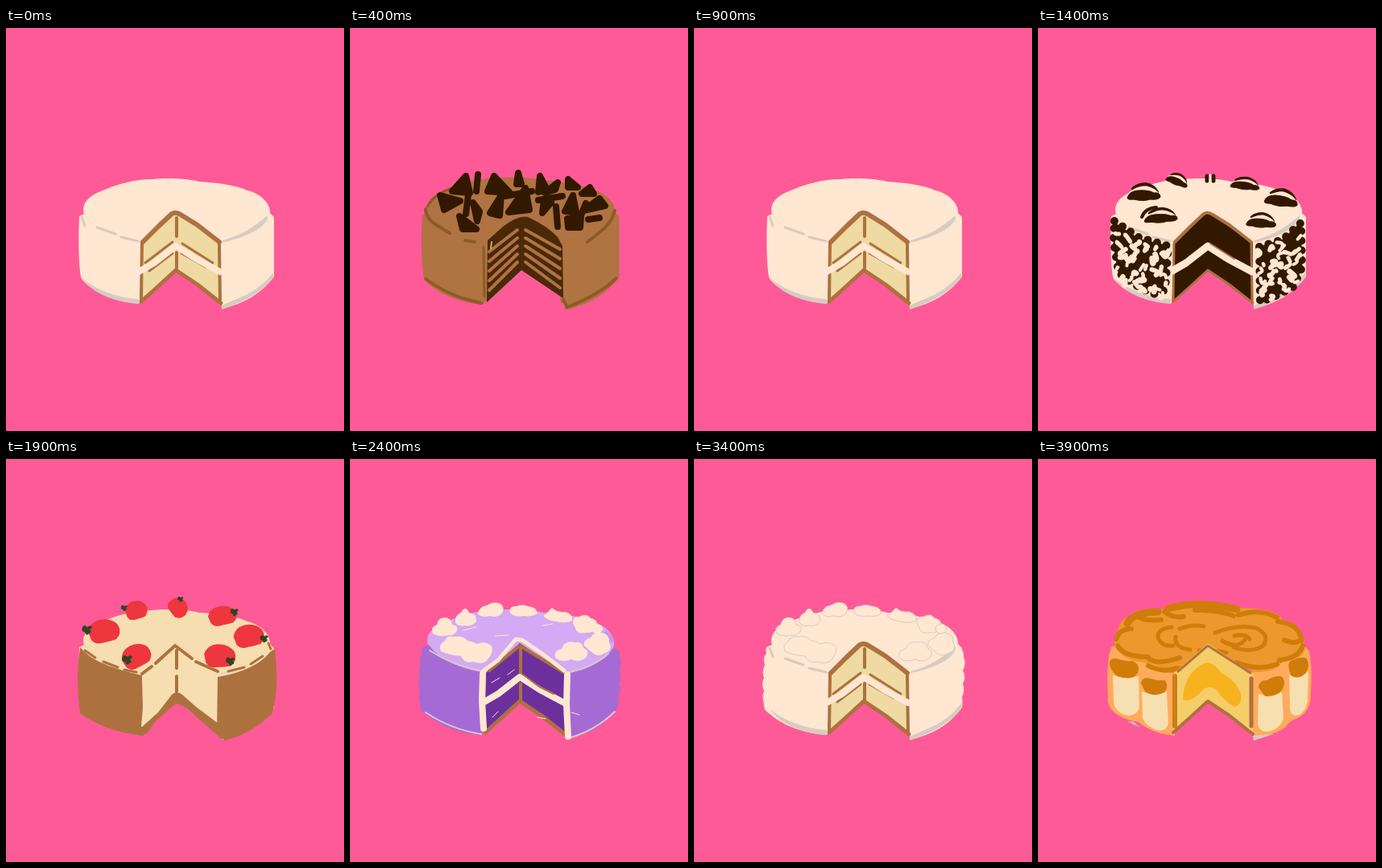
Write an HTML page that moves like this. It is 420 px wide and 501 px high and loops after 4.4 s.

```html
<!DOCTYPE html>
<html lang="en">
<head>
<meta charset="utf-8">
<title>Cakes</title>
<style>
html, body { margin: 0; width: 100%; height: 100%; overflow: hidden; background: #ff5a98; }
svg { display: block; width: 100%; height: 100%; }
.cake { visibility: hidden; animation: show 4400ms step-end infinite; animation-delay: calc(var(--at) * 1ms - 4400ms); }
.first { animation-name: first; animation-delay: 0ms; }
@keyframes show { 0% { visibility: visible; } 11.3636%, 100% { visibility: hidden; } }
@keyframes first { 0% { visibility: visible; } 9.0909%, 100% { visibility: hidden; } }
.line { fill: none; stroke-linecap: round; stroke-linejoin: round; }
.cream { fill: #ffe7d2; }
.dark { fill: #331800; stroke: #331800; }
.beads { fill: none; stroke: #331800; stroke-width: 10; stroke-linecap: round; stroke-dasharray: 0 12; }
.brown { stroke: #ad713f; }
</style>
</head>
<body>
<svg viewBox="0 0 420 501" preserveAspectRatio="none">
<defs>
  <path id="top" d="M97 231C93 218 104 208 118 203C138 194 160 188 182 188C200 186 225 187 240 191C260 192 285 195 300 202C318 206 330 220 328 232C324 246 300 260 266 267L211 229L169 266C135 260 108 250 97 231Z"/>
  <path id="left" d="M91 234L97 231C108 249 135 260 170 266L166 342C135 341 105 326 94 312C90 300 90 260 91 234Z"/>
  <path id="right" d="M266 267C300 260 320 248 328 230L333 235V309C318 330 295 343 268 349Z"/>
  <path id="cut" d="M169 266L211 229L267 267V343L212 301L167 341Z"/>
  <path id="band" d="M165 303L184 292L211 271L236 287L266 303"/>
  <path id="roof" d="M170 266L189 247L206 231Q211 228 217 232L238 245L265 266"/>
  <path id="floor" d="M168 340L187 323L211 301L238 319L267 342"/>
  <path id="walls" d="M169 268L168 339M265 268L266 341"/>
  <path id="puffLeft" d="M92 233L98 231C110 249 135 260 167 266L164 343C135 341 108 330 93 316Q86 312 87 304Q84 296 87 288Q83 280 87 272Q84 264 88 256Q85 246 90 242Q88 235 92 233Z"/>
  <path id="puffRight" d="M268 266C300 260 318 248 326 236Q336 234 335 246Q339 255 334 263Q339 272 334 279Q337 289 333 296Q336 310 326 317C313 333 293 343 270 348Z"/>
  <g id="dollops">
    <path d="M103 217Q99 209 108 206Q109 198 117 197Q126 197 127 206Q136 207 132 215Q128 220 123 219Q111 222 103 217ZM113 239Q109 231 118 226Q120 219 130 221Q140 219 146 226Q154 227 157 230Q170 225 177 234Q177 243 172 248Q166 257 153 252Q142 255 138 245Q123 244 113 239ZM131 203Q130 194 138 191Q143 181 148 191Q158 193 157 202Q151 209 143 207Q134 209 131 203ZM159 192Q161 183 170 182Q179 176 187 180Q193 184 189 192Q182 198 174 195Q163 198 159 192ZM199 191Q197 183 206 183Q214 180 221 183Q232 184 233 192Q225 197 216 195Q204 197 199 191ZM240 195Q246 191 251 185Q257 191 267 190Q278 193 276 201Q266 205 257 202Q247 202 240 195ZM277 204Q277 195 285 196Q294 191 299 198Q309 200 306 208Q304 217 294 216Q281 218 280 210ZM291 232Q289 225 299 222Q304 214 313 216Q323 218 322 228Q327 238 317 241Q308 248 299 239ZM255 247Q253 238 263 236Q267 225 279 228Q289 226 290 235Q299 239 293 247Q284 254 275 249Q264 254 255 247Z"/>
    <ellipse cx="307" cy="211" rx="7" ry="6"/>
  </g>
  <g id="plain">
    <g class="cream"><use href="#top"/><use href="#left"/><use href="#right"/></g>
    <path fill="#d8cbc0" d="M94 311C112 325 135 335 165 337V343C135 341 108 330 94 311ZM268 345L300 331Q320 320 332 304V311Q312 335 268 350Z"/>
    <path class="line" stroke="#d8cbc0" stroke-width="3" d="M94 235L98 246M113 248L136 256M143 260L164 265"/>
    <path fill="#d8cbc0" d="M269 264Q298 257 325 233Q326 243 308 253Q291 262 269 266Z"/>
  </g>
  <g id="vanilla">
    <use href="#plain"/>
    <use href="#cut" fill="#eedaa2"/>
    <g class="line brown">
      <use href="#walls" stroke-width="4"/>
      <use href="#floor" stroke-width="5"/>
      <use href="#roof" stroke-width="6"/>
      <path stroke-width="4" d="M212 236V259M212 279V300"/>
      <path stroke-width="3" d="M173 292L207 266M219 268L257 292M178 302L207 280M218 280L248 297"/>
    </g>
    <use href="#band" class="line" stroke="#ffe7d2" stroke-width="8"/>
  </g>
  <path id="berry" fill="#ee363f" d="M-20 1Q-18 -11 -6 -14Q9 -17 17 -8Q23 2 15 10Q6 13 0 14Q-10 18 -16 11Z"/>
  <path id="leaf" fill="#2b4623" d="M-6 -3Q-4 -7 0 -3Q5 -7 6 -2L3 0Q7 4 2 5Q-1 9 -3 3Q-8 3 -6 -3Z"/>
  <g id="cookie">
    <path class="line" stroke="#331800" stroke-width="4" d="M-13 -5Q-7 -11 3 -11Q13 -9 17 -1"/>
    <path class="line" stroke="#ffe7d2" stroke-width="4" d="M-16 0Q-6 -7 4 -6Q13 -5 18 2"/>
    <path class="dark" stroke="none" d="M-20 6Q-18 -2 -7 -3Q6 -4 13 0Q21 -1 21 5Q19 9 8 8Q0 11 -12 8Q-20 9 -20 6Z"/>
  </g>
  <clipPath id="inTop"><use href="#top"/></clipPath>
  <clipPath id="inLeft"><use href="#left"/></clipPath>
  <clipPath id="inRight"><use href="#right"/></clipPath>
</defs>
<rect width="420" height="501" fill="#ff5a98"/>

<g class="cake first"><use href="#vanilla"/></g>

<g class="cake" style="--at:400">
  <g fill="#b07342" stroke="#b07342" stroke-width="3" stroke-linejoin="round">
    <use href="#top"/><use href="#left"/><use href="#right"/>
  </g>
  <path class="line" stroke="#b07342" stroke-width="8" d="M168 268V336M265 268V338M168 266L211 235L262 266"/>
  <g class="line" stroke="#8e5b27">
    <path stroke-width="4" d="M94 225Q94 237 109 246L124 255M94 312Q116 328 140 336L163 342M143 264L155 266"/>
    <path stroke-width="4" d="M329 227Q326 242 309 255L295 266M331 311Q311 331 270 347L265 338"/>
    <path stroke-width="3" d="M96 222Q106 205 130 198M166 272L167 334"/>
  </g>
  <path fill="#4a2908" d="M171 264L190 247Q214 229 225 237Q246 247 258 260L264 271L265 336L213 301L170 341Z"/>
  <g id="stripes" class="line" stroke="#b07342" stroke-width="4"></g>
  <path class="line" stroke="#4a2908" stroke-width="4" d="M213 240V299"/>
  <path class="line" stroke="#d5a56c" stroke-width="2" d="M176 266L175 274"/>
  <path class="dark" stroke-width="8" stroke-linejoin="round" stroke-linecap="round" d="M144 184L127 203L149 205ZM159 182L157 203M112 208L137 215L117 226ZM147 207L144 231M136 234L157 250L140 250ZM153 217L161 228L158 240ZM179 184L199 205L171 203ZM188 208L174 230L186 233ZM209 180L207 194L213 194ZM193 209L226 203M218 199L197 229L223 226ZM236 184L234 204L245 201ZM258 192L242 205L255 201ZM271 188L271 198L283 198ZM234 214L264 209M241 213L239 230L250 217M256 222L258 247M277 208L267 228L281 228ZM298 198L288 206L303 206ZM310 212L317 221L290 227ZM270 237L287 234L286 248L271 248ZM310 236L296 238M287 233L293 218"/>
</g>

<g class="cake" style="--at:900"><use href="#vanilla"/></g>

<g class="cake" style="--at:1400">
  <use href="#plain"/>
  <use href="#cut" fill="#331800"/>
  <g class="line brown"><use href="#roof" stroke-width="4"/><use href="#walls" stroke-width="3"/><use href="#floor" stroke-width="3"/></g>
  <use href="#band" class="line" stroke="#ffe7d2" stroke-width="9"/>
  <path class="line brown" stroke-width="2" d="M214 268L244 287"/>
  <path class="dark" stroke="none" d="M95 242L125 262L162 271L158 328L143 329L118 318L100 304L94 270Z"/>
  <path class="dark" stroke="none" d="M275 272L304 263L326 242L328 298L317 322L298 332L276 341Z"/>
  <path class="beads" d="M95 240L125 260L162 271L158 326L143 331L118 318L100 304L94 266Z"/>
  <path class="beads" d="M275 272L304 263L327 242L328 298L317 322L298 332L276 341Z"/>
  <g class="line" stroke="#ffe7d2">
    <g clip-path="url(#inLeft)" id="bitsL"></g>
    <g clip-path="url(#inRight)" id="bitsR"></g>
  </g>
  <use href="#cookie" x="131" y="205"/>
  <use href="#cookie" transform="translate(173 189) rotate(22) scale(.68)"/>
  <g class="line" stroke="#331800" stroke-width="5"><path d="M210 184V190M218 184V190"/><path stroke="#ffe7d2" stroke-width="3" d="M214 183V191"/></g>
  <use href="#cookie" transform="translate(257 194) rotate(7) scale(.88 .72)"/>
  <use href="#cookie" transform="translate(302 212) rotate(8)"/>
  <use href="#cookie" transform="translate(277 240) rotate(4) scale(.9 .85)"/>
  <use href="#cookie" transform="translate(152 234) rotate(-3) scale(1 .85)"/>
  <path class="line" stroke="#331800" stroke-width="4" d="M129 235Q133 224 147 223"/>
</g>

<g class="cake" style="--at:1900">
  <g fill="#f6deb0"><use href="#left"/><use href="#right"/><use href="#top"/><use href="#cut"/></g>
  <path fill="#ad713f" d="M92 234L98 240C112 254 140 262 169 269L170 310L168 332L175 339L170 344C140 341 112 331 92 316Q86 272 92 234ZM263 271C298 265 318 253 328 240L334 236Q338 270 335 296L331 316C316 331 296 344 272 350L262 342Z"/>
  <path fill="#ad713f" d="M168 334L189 315L206 293Q212 287 219 293L236 308L268 332L269 349L237 321Q220 305 211 304L187 325L174 342Z"/>
  <g class="line brown">
    <path stroke-width="4" d="M169 267L181 258M186 254L210 232L231 248M236 252L263 264M212 238V260M212 270V289"/>
    <path stroke-width="3" d="M98 238L111 247M121 252L139 259M147 262L162 265M276 264L296 259M304 255L319 245M326 229L329 236"/>
  </g>
  <use href="#berry" x="122" y="214"/>
  <use href="#berry" transform="translate(162 188) scale(.7 .8)"/>
  <use href="#berry" transform="translate(214 185) rotate(70) scale(.65 .78)"/>
  <use href="#berry" transform="translate(269 195) scale(.9 .83)"/>
  <use href="#berry" transform="translate(302 220) scale(.97)"/>
  <use href="#berry" transform="translate(266 245) rotate(10)"/>
  <use href="#berry" transform="translate(162 245) rotate(-14) scale(.95 1)"/>
  <use href="#leaf" x="101" y="212"/><use href="#leaf" transform="translate(147 185) scale(.65)"/>
  <use href="#leaf" transform="translate(217 174) scale(.6)"/><use href="#leaf" transform="translate(284 190) scale(.8)"/>
  <use href="#leaf" transform="translate(321 223) scale(.8)"/><use href="#leaf" transform="translate(279 251) scale(.9)"/>
  <use href="#leaf" x="151" y="249"/>
</g>

<g class="cake" style="--at:2400">
  <use href="#top" fill="#d3aaf3"/>
  <g fill="#a66ad5"><use href="#puffLeft"/><use href="#puffRight"/></g>
  <use href="#cut" fill="#6c309d"/>
  <path class="line" stroke="#d9c9c9" stroke-width="2" d="M94 315Q125 336 163 342M272 347Q306 337 329 314M99 238Q128 257 166 264M273 265Q302 259 321 242"/>
  <g class="line brown"><use href="#floor" stroke-width="5"/><path stroke-width="4" d="M173 263L211 232L265 265M212 234V268M212 280V300M268 268V292"/></g>
  <g class="line" stroke="#ffe7d2">
    <path stroke-width="5" d="M165 264L184 250L206 224L214 225L240 243L266 263"/>
    <path stroke-width="8" d="M165 267L164 300L166 335M270 268L269 305L271 345"/>
    <use href="#band" stroke-width="8"/>
    <path stroke-width="1" d="M140 213L157 209M180 220L197 219M239 207L252 205M176 278L186 272M177 321L184 314M233 321L243 323M275 315L285 318M196 268L204 262"/>
  </g>
  <path class="line brown" stroke-width="2" d="M215 268L235 283L253 292"/>
  <path class="line" stroke="#c795ea" stroke-width="6" d="M319 217L325 225"/>
  <use href="#dollops" class="cream"/>
</g>

<g class="cake" style="--at:2900">
  <g fill="#e3ecc6" stroke="#e3ecc6" stroke-width="2" stroke-linejoin="round"><use href="#top"/><use href="#left"/><use href="#right"/></g>
  <path fill="#e3ecc6" d="M91 236Q86 270 88 303L94 315ZM331 236Q339 270 333 309Z"/>
  <path fill="#91a047" d="M99 228Q99 211 128 203Q160 191 190 190Q235 189 279 199Q318 207 326 230Q316 245 287 251L258 254L213 222L177 253Q122 252 99 228Z"/>
  <path fill="#91a047" d="M93 256L110 258L137 268L162 267L161 299L154 314L155 326L137 322L115 312L97 300ZM275 273L301 268L326 251L330 272L329 300L318 316L300 326L285 335L278 322Z"/>
  <g class="line" stroke="#e3ecc6">
    <g clip-path="url(#inTop)" id="flakesT"></g><g clip-path="url(#inLeft)" id="flakesL"></g><g clip-path="url(#inRight)" id="flakesR"></g>
    <path stroke-width="6" d="M98 237Q119 257 164 262L190 239L210 225L238 243L267 262Q307 259 326 234"/>
  </g>
  <path class="line" stroke="#80943a" stroke-width="3" d="M98 241Q119 258 153 268M277 267Q307 262 327 244M185 191L193 189M216 189L221 186"/>
  <use href="#cut" fill="#91a047"/>
  <g class="line" stroke="#b4633c"><use href="#roof" stroke-width="3"/><use href="#floor" stroke-width="2"/><path stroke-width="3" d="M168 338L174 340M260 337L267 342M265 268V291"/><path stroke-width="1" d="M211 235V265M212 279V298"/></g>
  <use href="#band" class="line" stroke="#e3ecc6" stroke-width="9"/>
  <path class="line" stroke="#b4633c" stroke-width="2" d="M214 268L235 281"/>
  <path class="line" stroke="#f7e4d2" stroke-width="4" d="M243 293L263 302"/>
  <path fill="#d8cbc0" d="M130 336L165 339V343Q146 342 130 336ZM270 346L298 336L270 350Z"/>
</g>

<g class="cake" style="--at:3400">
  <g class="cream"><use href="#puffLeft"/><use href="#puffRight"/></g>
  <use href="#vanilla"/>
  <use href="#dollops" class="cream" stroke="#d8cbc0" stroke-width="1"/>
</g>

<g class="cake" style="--at:3900">
  <path fill="#ffab5b" d="M91 234L100 230L171 262L170 344Q141 341 125 327Q110 325 99 318Q85 309 87 296Q85 270 88 244ZM265 265L330 231L337 239Q341 258 339 291Q339 315 322 322Q311 327 308 333Q292 345 267 345Z"/>
  <path fill="#d8cbc0" d="M111 326L119 327L127 334ZM267 344L293 342L268 350Z"/>
  <path fill="#f6dfb0" d="M93 269Q109 274 125 270L126 310Q122 319 111 319Q95 315 94 302ZM129 289Q145 296 160 289L162 328Q160 339 149 337Q132 332 130 321ZM274 292Q288 297 303 290L305 322Q302 335 286 339Q273 340 273 326ZM312 268Q324 273 336 264L335 301Q332 317 321 319Q312 319 313 304Z"/>
  <path fill="#cf7c0a" d="M89 257Q87 247 98 248Q107 252 117 251Q128 255 124 266Q119 274 108 272Q95 272 89 257ZM128 279Q129 270 140 273Q149 276 158 275Q163 283 157 290Q145 297 133 289ZM274 284Q275 274 285 275Q291 270 302 270Q309 275 304 286Q297 296 282 295ZM312 261Q309 251 319 249Q328 245 334 248Q339 258 332 267Q323 275 314 269Z"/>
  <path fill="#ec982c" d="M97 236Q92 224 99 215Q100 202 113 195Q125 183 152 189Q161 179 187 179Q222 174 244 185Q275 184 293 191Q304 195 304 204Q325 206 327 222Q337 234 327 245Q316 251 303 252Q299 265 268 265L211 231L174 266Q140 268 134 253Q109 252 97 236Z"/>
  <g class="line" stroke="#cf7c0a" stroke-width="6">
    <path stroke-width="9" d="M111 204Q119 190 149 190M161 186Q201 175 247 187"/>
    <path d="M97 224Q101 211 116 211M99 232Q107 246 136 246Q145 258 176 247M137 257Q153 266 174 260M121 194Q130 202 153 200M157 190Q167 198 181 196M195 188Q224 187 243 195M249 194Q275 185 297 197M298 202Q326 205 327 226M329 232Q325 247 300 250M247 253Q273 264 297 255M306 225Q321 232 328 223"/>
    <path stroke-width="5" d="M166 209Q148 211 149 222Q154 234 168 232M171 221Q169 235 189 237M176 211Q192 205 206 208M200 238Q218 236 234 241M220 216Q247 205 271 210Q289 219 280 232Q265 242 243 234M229 226Q247 237 257 225M244 220Q257 216 263 224"/>
  </g>
  <use href="#cut" fill="#f5cd69"/>
  <path fill="#f7b31e" d="M180 299Q180 282 190 267Q202 254 211 253Q219 254 228 266Q247 276 252 292Q254 306 244 308Q230 300 221 286Q210 280 202 290Q188 304 180 299Z"/>
  <g class="line">
    <path stroke="#b2743c" stroke-width="3" d="M174 264L211 232L264 266"/>
    <path stroke="#cd7e19" stroke-width="6" d="M170 270V332"/>
    <path stroke="#ad713f" stroke-width="5" d="M265 273V332"/>
    <use href="#floor" stroke="#ad713f" stroke-width="4"/>
  </g>
</g>
</svg>
<script>
const add = (id, attrs) => {
  const el = document.createElementNS("http://www.w3.org/2000/svg", "path");
  for (const k in attrs) el.setAttribute(k, attrs[k]);
  document.getElementById(id).append(el);
};

for (let i = 0; i < 5; i++) {
  const y = 251 + i * 10;
  add("stripes", { d: `M173 ${y + 27 + i * 2}L208 ${y}M218 ${y}L261 ${y + 24 + i * 2}` });
}

// Bent brush dabs on a jittered grid; slope follows the cake's rim.
function scatter(id, x0, y0, cols, rows, step, slope, size, seed) {
  const rnd = () => (seed = (seed * 16807) % 2147483647) / 2147483647;
  const off = () => (rnd() - .5) * size * 2.6;
  for (let r = 0; r < rows; r++) for (let c = 0; c < cols; c++) {
    const x = x0 + (c + rnd() * .9) * step, y = y0 + (r + rnd() * .9) * step + c * step * slope;
    add(id, { d: `M${x} ${y}q${off()} ${off()} ${off()} ${off()}`, "stroke-width": size * (.7 + rnd() * .6) });
  }
}
scatter("bitsL", 96, 252, 6, 6, 11, .35, 5.5, 71);
scatter("bitsR", 273, 276, 5, 6, 11, -.4, 5.5, 913);
scatter("flakesT", 98, 190, 19, 6, 12.5, 0, 7, 37);
scatter("flakesL", 92, 252, 6, 5, 13, .35, 9, 221);
scatter("flakesR", 273, 274, 5, 5, 13, -.35, 9, 509);
</script>
</body>
</html>
```
